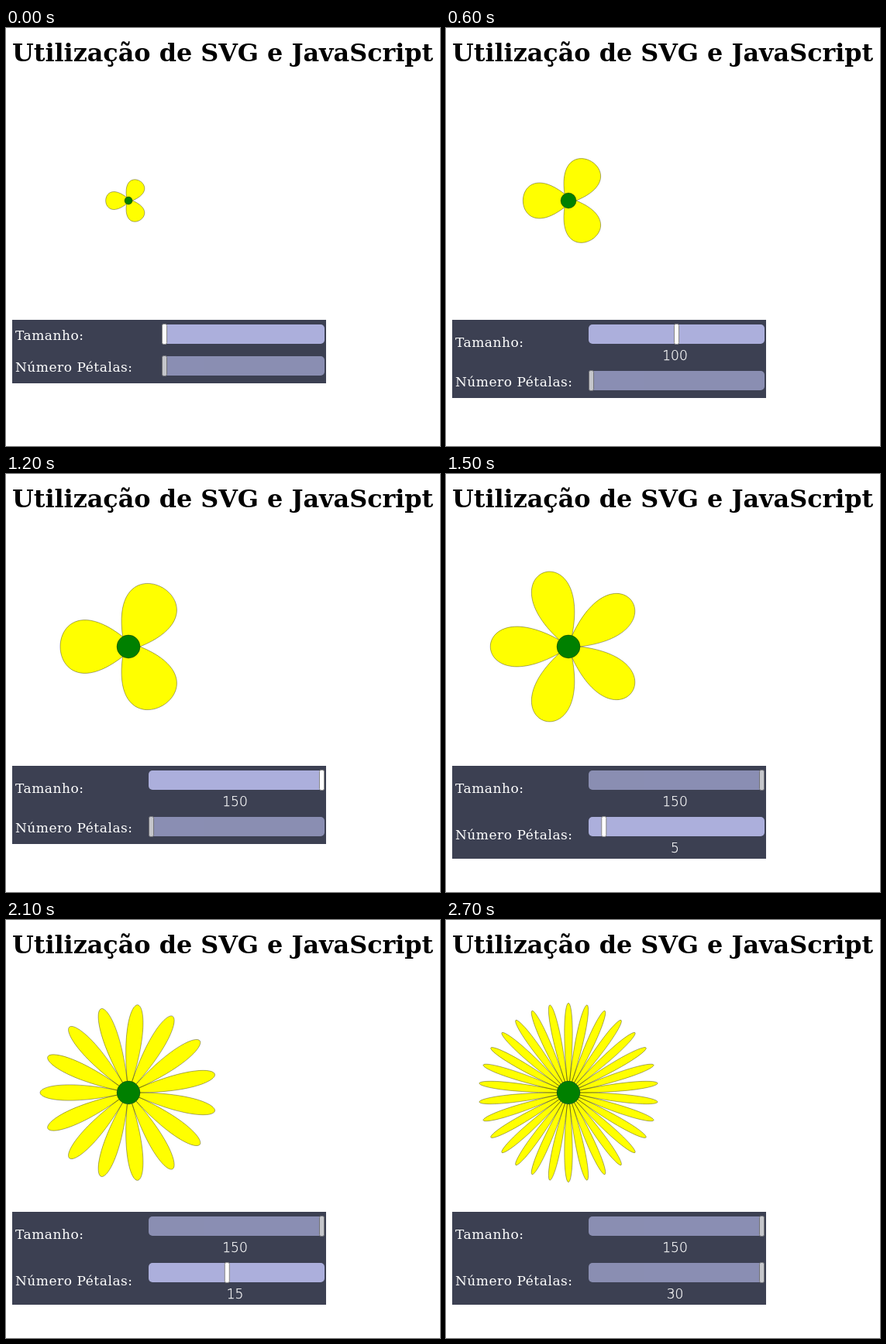
Animation, 560 px wide and 540 px high, one loop 3 s. Source, as an HTML page:

```html
<!DOCTYPE html>
<html lang="pt">
<head>
<meta charset="utf-8">
<style>
html, body { margin: 0; width: 100%; height: 100%; overflow: hidden; background: #fff; }
svg { display: block; }
.title { font: bold 31.82px "DejaVu Serif", serif; }
.label, .value { font-size: 17px; fill: #fff; }
.label { font-family: "DejaVu Serif", serif; letter-spacing: .55px; }
.value { font-family: "DejaVu Sans", sans-serif; font-weight: 200; text-anchor: middle; stroke: #fff; stroke-width: .25; }
.flower { stroke: #000; stroke-width: .35; }
</style>
</head>
<body>
<svg width="560" height="540" viewBox="0 0 560 540">
  <text class="title" x="8" y="43">Utilização de SVG e JavaScript</text>
  <g class="flower" transform="translate(158 223)">
    <path id="petals" fill="#ff0"/>
    <circle id="core" fill="green"/>
  </g>
  <g id="panel"></g>
</svg>
<script>
const $ = id => document.getElementById(id);
const STEP = 300;
// size, petal count, active slider (0 = none)
const states = [
  [50, 3, 1], [60, 3, 1], [100, 3, 1], [125, 3, 1], [150, 3, 1],
  [150, 5, 2], [150, 10, 2], [150, 15, 2], [150, 20, 2], [150, 30, 0]
];

function petals(size, n) {
  const half = Math.PI / n;
  const spread = Math.atan(.97 * Math.sin(half));
  const at = (r, a) => (r * Math.cos(a)).toFixed(2) + ' ' + (r * Math.sin(a)).toFixed(2);
  let d = '';
  for (let k = 0; k < n; k++) {
    const a = (2 * k + 1) * half, r = size / 10;
    d += `M${at(r, a - half)}C${at(size, a - spread)} ${at(size, a + spread)} ${at(r, a + half)}`;
  }
  return d;
}

function row(label, y, x, part, value, active) {
  const thumb = x + .5 + part * (404 - x);
  const base = y + (value ? 29 : 20);
  return `<text class="label" x="11.9" y="${base}">${label}</text>
    <g opacity="${active ? 1 : .7}">
      <rect x="${x}" y="${y}" width="${411 - x}" height="25" rx="5" fill="#acafdc"/>
      <rect x="${thumb}" y="${y - .5}" width="6" height="26" rx="2" fill="#fff" stroke="#888"/>
    </g>
    <text class="value" x="${(x + 411) / 2 - 2}" y="${y + 46}">${value}</text>`;
}

function show([size, n, active]) {
  const hasSize = size > 50, hasCount = n > 3;
  const x = size < 60 ? 201 : size < 100 ? 188 : 184;
  const y2 = hasSize ? 443 : 424;
  const height = 82 + 19 * hasSize + 19 * hasCount;
  $('petals').setAttribute('d', petals(size, n));
  $('core').setAttribute('r', size / 10);
  $('panel').innerHTML =
    `<rect x="8" y="377" width="405" height="${height}" fill="#3c4052"/>` +
    row('Tamanho:', 383, x, (size - 50) / 100, hasSize ? size : '', active === 1) +
    row('Número Pétalas:', y2, x, (n - 3) / 27, hasCount ? n : '', active === 2);
}

let start, last = -1;
function tick(now) {
  start ??= now;
  const i = Math.floor((now - start) / STEP) % states.length;
  if (i !== last) show(states[last = i]);
  requestAnimationFrame(tick);
}
show(states[0]);
requestAnimationFrame(tick);
</script>
</body>
</html>
```
